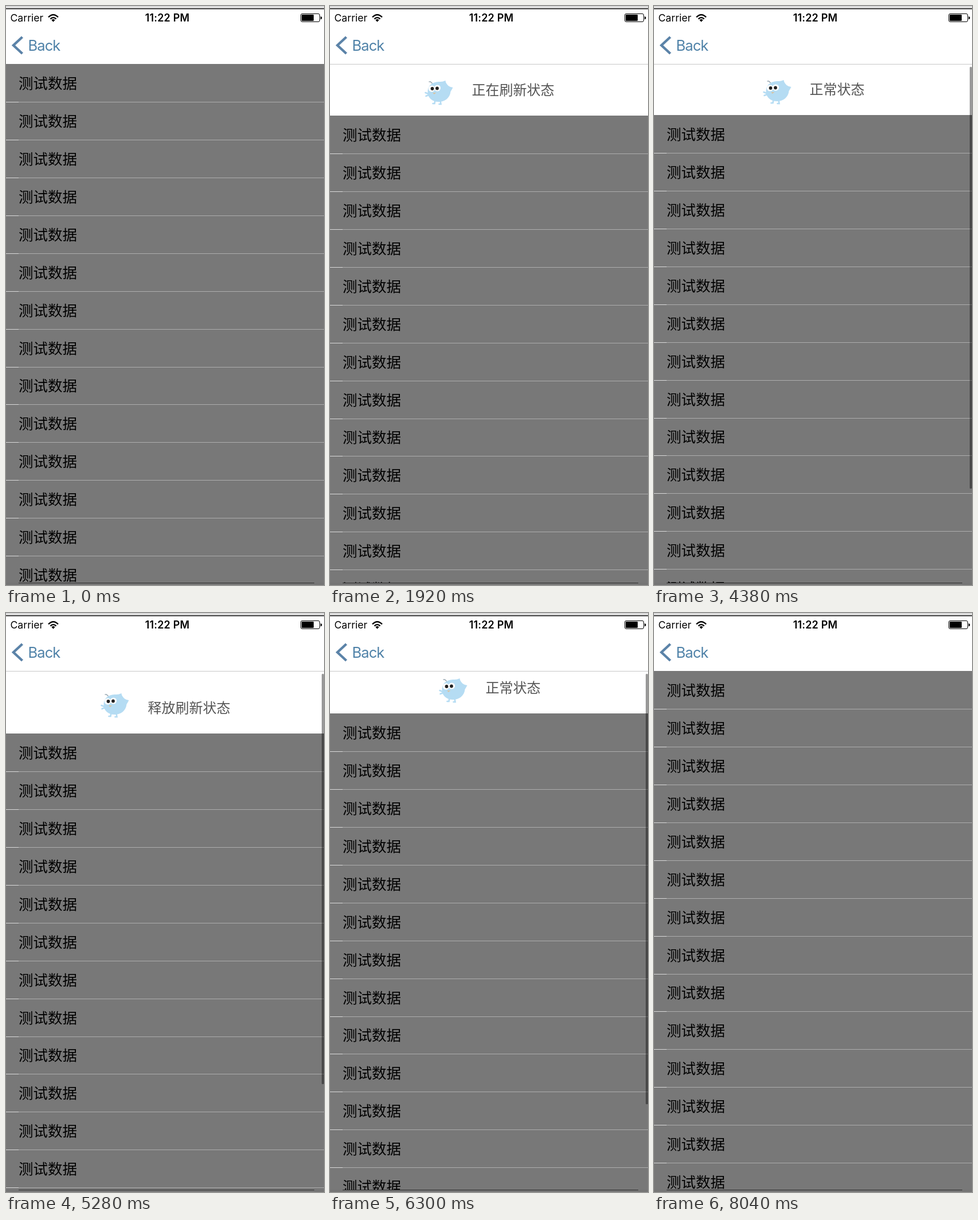
These frames come from a looping animation (555x1009 px, 8100 ms). An HTML page:

```html
<!DOCTYPE html>
<html lang="zh-Hans">
<head>
<meta charset="utf-8">
<title>Pull to refresh</title>
<style>
  html, body { margin: 0; width: 100%; height: 100%; overflow: hidden; background: #fff; }
  svg { display: block; width: 555px; height: 1009px; }
  text { font-family: Inter, Roboto, sans-serif; }
  .cjk { font-family: "Noto Sans CJK SC", "Noto Sans CJK", sans-serif; }
  .row { font-size: 25.5px; fill: #000; }
  .state { font-size: 24px; fill: #555; text-anchor: middle; }
</style>
</head>
<body>
<svg viewBox="0 0 555 1009">
  <defs>
    <clipPath id="view"><rect y="101" width="555" height="904"/></clipPath>
    <g id="cell">
      <rect width="555" height="66" fill="#787878"/>
      <rect y="66" width="555" height="1" fill="#adadad"/>
      <rect y="66" width="22" height="1" fill="#dadada"/>
      <text class="cjk row" x="22" y="43">测试数据</text>
    </g>
  </defs>

  <rect width="555" height="1009" fill="#fff"/>
  <rect y="101" width="555" height="1" fill="#c8c8c8"/>

  <g clip-path="url(#view)">
    <g id="list">
      <text id="state" class="cjk state" x="319.5" y="-36"></text>
      <g id="bird">
        <path d="M-18 3 L-23 1 M-17 5 L-22 7 M-6 14 L-7 20 L-10 20 M3 15 L4 21 L1 21"
              fill="none" stroke="#b5dcf3" stroke-width="2.6" stroke-linecap="round"/>
        <path fill="#b5dcf3" d="M-19 0 C-19 -13 -9 -18 2 -18 C7 -18 9 -19 12 -20 C12 -17 14 -14 17 -11 Q21 -8 25 -8 Q23 -4 21 -1 C20 10 11 17 0 17 C-11 17 -19 10 -19 0 Z"/>
        <path d="M-11 -15 L-14 -18 L-17 -18" fill="none" stroke="#9aa9b2" stroke-width="1.6"/>
        <circle cx="-12" cy="-6" r="5.6" fill="#fff"/>
        <circle cx="-2" cy="-7" r="5.6" fill="#fff"/>
        <circle cx="-11" cy="-6" r="2.9" fill="#222"/>
        <circle cx="-2.5" cy="-6.5" r="2.9" fill="#222"/>
        <path d="M-10 1 L-4 1 L-8 4 Z" fill="#d9c3a0"/>
      </g>
    </g>
    <rect id="bar" x="551" y="106" width="4" rx="1.5"/>
  </g>

  <rect y="1005" width="555" height="4" fill="#757575"/>
  <rect x="22" y="1005" width="516" height="1" fill="#303030"/>

  <rect width="555" height="4" fill="#dcdcdc"/>
  <rect y="4" width="555" height="1.5" fill="#111"/>

  <text x="7.5" y="27" font-size="17.6">Carrier</text>
  <path d="M74 19.5 Q82.5 11 91 19.5 M77.5 22.7 Q82.5 17.5 87.5 22.7"
        fill="none" stroke="#000" stroke-width="2.4"/>
  <path d="M79.5 24.5 Q82.5 21.7 85.5 24.5 L82.5 27.7 Z"/>
  <text x="281.5" y="27" font-size="18" font-weight="600" text-anchor="middle" letter-spacing="0.2">11:22 PM</text>
  <rect x="514.5" y="13.5" width="33" height="14" rx="2.5" fill="none" stroke="#000"/>
  <rect x="516" y="15" width="21" height="11" rx="1"/>
  <path d="M549 18 Q551.5 18.5 551.5 20.8 Q551.5 23 549 23.5 Z"/>

  <path d="M28.5 54 L13 68.5 L28.5 83" fill="none" stroke="#5b83a8" stroke-width="4.4"/>
  <text x="38.5" y="78" font-size="25.5" letter-spacing="-0.9" fill="#4f82a8">Back</text>
</svg>

<script>
  const LOOP = 8100, STEP = 60, THRESHOLD = 90, PITCH = 65.93;
  const get = id => document.getElementById(id);
  const list = get('list'), label = get('state'), bird = get('bird'), bar = get('bar');

  // [time, pull distance]
  const pull = [
    [0, 0], [440, 0], [1080, 203], [1140, 203], [1500, 90], [2803, 90], [3180, 0],
    [3980, 0], [4760, 171.5], [5280, 109], [6300, 74], [6360, 70], [6600, 0],
    [6800, 0], [7240, 120], [7440, 112], [7860, 0], [LOOP, 0]
  ];
  // [time, scroll indicator strength]
  const glow = [
    [0, 0], [470, 0], [490, 1], [1400, 1], [1700, 0], [4000, 0], [4030, 1],
    [6480, 1], [6640, 0], [6810, 0], [6840, 1], [7800, 1], [8060, 0], [LOOP, 0]
  ];

  function sample(keys, t) {
    const i = keys.findIndex(k => k[0] > t);
    const [t0, a] = keys[i - 1], [t1, b] = keys[i];
    const x = (t - t0) / (t1 - t0);
    return a + (b - a) * x * x * (3 - 2 * x);
  }

  for (let i = 0; i < 15; i++) {
    const cell = document.createElementNS('http://www.w3.org/2000/svg', 'use');
    cell.setAttribute('href', '#cell');
    cell.setAttribute('y', Math.round(i * PITCH));
    // earlier rows stay on top so their separators show
    list.prepend(cell);
  }

  function draw(t) {
    const y = Math.round(sample(pull, t));
    const loading = t >= 1200 && t < 2800;
    const active = loading || y > THRESHOLD;
    const hop = active ? 9 * Math.sin(Math.PI * t / 320) ** 2 : 0;

    list.setAttribute('transform', `translate(0 ${101 + y})`);
    label.textContent = loading ? '正在刷新状态' : active ? '释放刷新状态' : '正常状态';
    bird.setAttribute('transform', `translate(${active ? 189.5 : 214.5} ${-41 - hop})`);
    bar.setAttribute('height', 824 - y);
    bar.setAttribute('opacity', 0.4 * sample(glow, t));
  }

  const start = performance.now();
  function tick() {
    const t = (performance.now() - start) % LOOP;
    draw(Math.floor(t / STEP) * STEP);
    requestAnimationFrame(tick);
  }
  tick();
</script>
</body>
</html>
```
